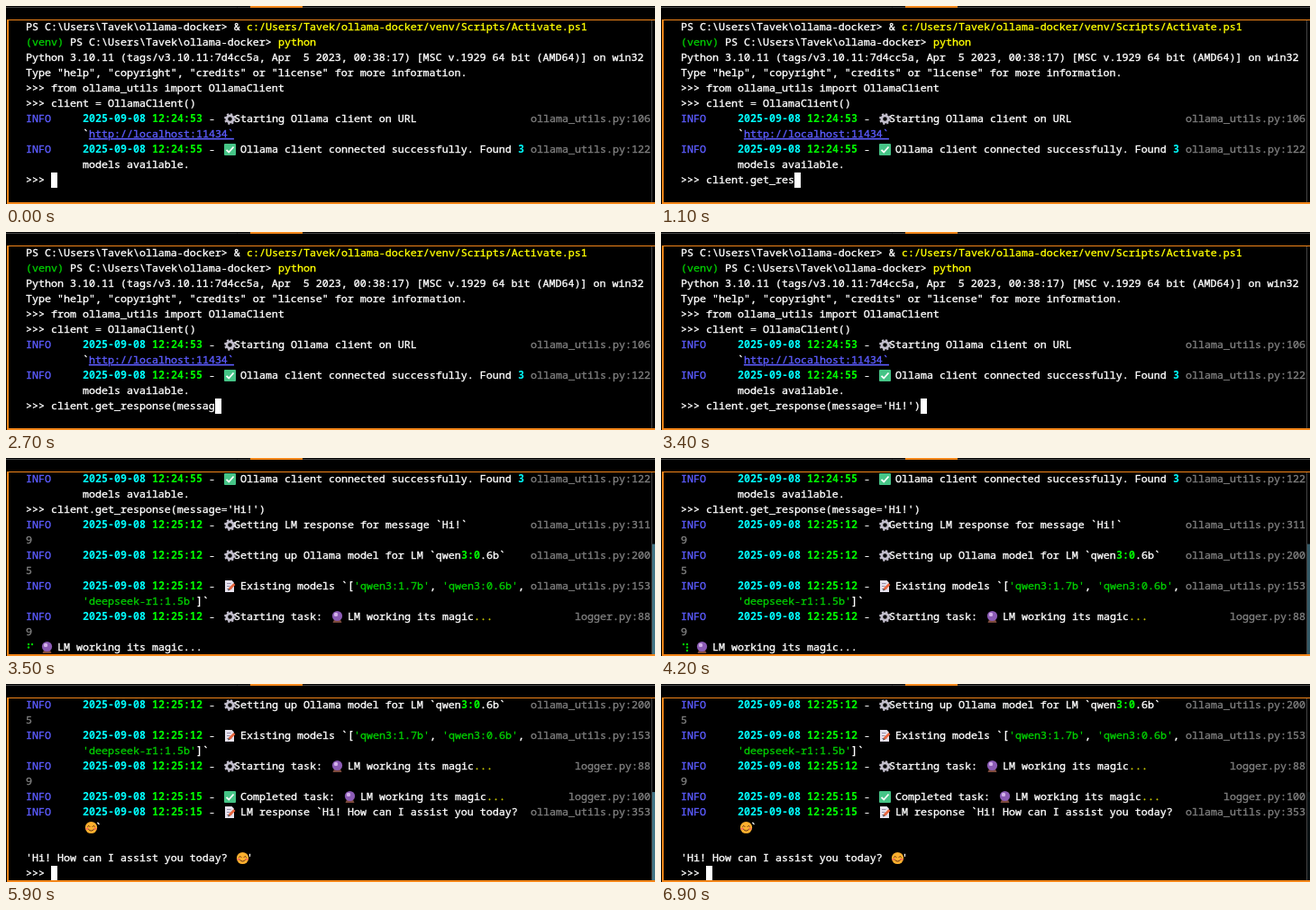
These frames come from a looping animation (720 by 220 pixels, 7000 ms). An HTML page:

```html
<!DOCTYPE html>
<html lang="en">
<head>
<meta charset="utf-8">
<title>Terminal session</title>
<style>
html, body { margin: 0; width: 100%; height: 100%; overflow: hidden; background: #000; }
svg { display: block; }
text { font: 11.667px "Noto Sans Mono", "DejaVu Sans Mono", monospace; white-space: pre; stroke-width: .35px; }
.bold { font-weight: 700; stroke-width: 0; }
.link { text-decoration: underline; }
</style>
</head>
<body>
<svg width="720" height="220" viewBox="0 0 720 220">
  <defs>
    <g id="gear" fill="none" stroke="#c3bfcd">
      <circle r="3.7" stroke-width="2.8"/>
      <circle r="5.4" stroke-width="2" stroke-dasharray="2.12"/>
    </g>
    <g id="check">
      <rect x="-6.5" y="-6.5" width="13" height="13" rx="1" fill="#45c486"/>
      <path d="M-4 .3L-1.3 3L4-3" fill="none" stroke="#fff" stroke-width="1.8"/>
    </g>
    <g id="memo">
      <path d="M-5.5-6.5H2L4.5-4V6.5H-5.5Z" fill="#e6e2ee"/>
      <path d="M-3.5-3H1M-3.5 0H0M-3.5 3H2" stroke="#998fa8"/>
      <path d="M-1 3.5L5-2.5" stroke="#e8643c" stroke-width="2.6"/>
      <path d="M-2.5 5L-1.7 2.6L0 4.3Z" fill="#444"/>
    </g>
    <g id="ball">
      <path d="M-5 6.5L-3 2H3L5 6.5Z" fill="#7d4a3c"/>
      <circle cy="-1" r="5.6" fill="#8b5bb5"/>
      <circle cx="-1.5" cy="-2.6" r="2.2" fill="#d3b2ea"/>
    </g>
    <g id="smile" fill="none" stroke="#5a2d16" stroke-linecap="round">
      <circle r="6.6" fill="#ffb02e" stroke="none"/>
      <path d="M-4-1Q-2.7-3.6-1.4-1M1.4-1Q2.7-3.6 4-1M-3 2Q0 5.4 3 2"/>
      <path d="M-5 1.3h1M4 1.3h1" stroke="#ff6b5a" stroke-width="2"/>
    </g>
  </defs>
  <path d="M0 1.5H720M716.5 16V218" stroke="#444"/>
  <g id="screen"></g>
  <g stroke="#f38518" stroke-width="2">
    <path d="M271 1H329M2 15V220M1 219H720"/>
    <path d="M1 15.5H720" stroke-width="1"/>
  </g>
</svg>
<script>
const LEFT = 22, TOP = 15, CELL = 7, ROW = 17, ROWS = 12, LAST_COL = 99;
const PRINT = 35, DONE = 56; // ticks of 100 ms

// Inline markup: "~x" switches style, "~>" aligns the rest to the right edge.
const styles = {
  w: ['#fff'], W: ['#fff', 'bold'], g: ['#00cd00'], G: ['#0f0', 'bold'], C: ['#0ff', 'bold'],
  y: ['#ff0'], Y: ['#cdcd00'], b: ['#5c5cff'], u: ['#5c5cff', 'link'], d: ['#7f7f7f'], '>': ['#7f7f7f']
};
const icons = { '⚙': 'gear', '✅': 'check', '📝': 'memo', '🔮': 'ball', '😊': 'smile' };

const info = (time, message, file) =>
  `~bINFO     ~C2025-09-08 ~G${time}~w - ${message}~>${file}`;
const indent = ' '.repeat(9);
const prompt = '>>> ';
const magic = '🔮 LM working its magic';
const command = "client.get_response(message='Hi!')";
const mistyped = 'client.get_resopns';
const typed = [0, 1, 3, 4, 5, 7, 8, 10, 11, 12, 13, 14, 15, 17, 18, 17, 15, 14,
  15, 16, 17, 18, 20, 21, 23, 24, 25, 26, 27, 28, 30, 31, 32, 33, 34];

const intro = [
  'PS C:\\Users\\Tavek\\ollama-docker> & ~yc:/Users/Tavek/ollama-docker/venv/Scripts/Activate.ps1',
  '~g(venv) ~wPS C:\\Users\\Tavek\\ollama-docker> ~ypython',
  'Python 3.10.11 (tags/v3.10.11:7d4cc5a, Apr  5 2023, 00:38:17) [MSC v.1929 64 bit (AMD64)] on win32',
  'Type "help", "copyright", "credits" or "license" for more information.',
  prompt + 'from ollama_utils import OllamaClient',
  prompt + 'client = OllamaClient()',
  info('12:24:53', '⚙Starting Ollama client on URL', 'ollama_utils.py:106'),
  indent + '`~uhttp://localhost:11434`',
  info('12:24:55', '✅ Ollama client connected successfully. Found ~C3', 'ollama_utils.py:122'),
  indent + 'models available.'
];
const task = [
  prompt + command,
  info('12:25:12', '⚙Getting LM response for message `Hi!`', 'ollama_utils.py:311'),
  '~d9',
  info('12:25:12', '⚙Setting up Ollama model for LM `qwen~G3:0~w.6b`', 'ollama_utils.py:200'),
  '~d5',
  info('12:25:12', "📝 Existing models `~W[~g'qwen3:1.7b'~w, ~g'qwen3:0.6b'~w,", 'ollama_utils.py:153'),
  indent + "~g'deepseek-r1:1.5b'~W]~w`",
  info('12:25:12', `⚙Starting task: ${magic}~Y...`, 'logger.py:88'),
  '~d9'
];
const answer = [
  info('12:25:15', `✅ Completed task: ${magic}~Y...`, 'logger.py:100'),
  info('12:25:15', '📝 LM response `Hi! How can I assist you today?', 'ollama_utils.py:353'),
  indent + '😊`',
  '',
  "'Hi! How can I assist you today? 😊'",
  prompt
];

const escapeText = s => s.replace(/&/g, '&amp;').replace(/</g, '&lt;');

function drawLine(line, row) {
  const y = TOP + row * ROW;
  let col = 0, style = 'w', out = '';
  for (const part of line.split(/(~.|⚙|✅|📝|🔮|😊)/u)) {
    const x = LEFT + col * CELL;
    if (part[0] === '~') {
      style = part[1];
    } else if (icons[part]) {
      out += `<use href="#${icons[part]}" x="${x + 9.5}" y="${y + 8.5}"/>`;
      col += 2;
    } else if (part) {
      const [color, cls = ''] = styles[style];
      const start = style === '>' ? LEFT + (LAST_COL - part.length) * CELL : x;
      out += `<text x="${start}" y="${y + 12}" fill="${color}" stroke="${color}" class="${cls}">${escapeText(part)}</text>`;
      col += part.length;
    }
  }
  return out;
}

const drawCursor = (col, row) =>
  `<rect x="${LEFT + col * CELL}" y="${TOP + row * ROW}" width="${CELL}" height="${ROW}" fill="#fff"/>`;

function drawSpinner(tick, row) {
  const step = Math.floor((tick - 42) * 100 / 63) + 22;
  const mask = '⠋⠙⠹⠸⠼⠴⠦⠧⠇⠏'.charCodeAt(step % 10) - 0x2800;
  let out = '';
  for (let dot = 0; dot < 6; dot++) {
    if (mask >> dot & 1) {
      const x = LEFT + 3 + 4 * Math.floor(dot / 3), y = TOP + row * ROW + 5 + 3.5 * (dot % 3);
      out += `<circle cx="${x}" cy="${y}" r="1.2" fill="#00cd00"/>`;
    }
  }
  return out;
}

// The thumb shows after each scroll, then fades over 800 ms.
function drawThumb(tick, total) {
  const fadeStart = tick < DONE ? 40 : 62;
  const opacity = 0.6 * Math.min(1, Math.max(0, 1 - (tick - fadeStart) / 8));
  const height = ROWS * ROW * ROWS / total;
  return `<rect x="717" y="${218 - height}" width="3" height="${height}" fill="#6fc3df" opacity="${opacity}"/>`;
}

function draw(tick) {
  const typing = tick < PRINT, done = tick >= DONE;
  const input = (tick > 11 && tick < 18 ? mistyped : command).slice(0, typed[tick]);
  const lines = typing ? [...intro, prompt + input]
    : [...intro, ...task, ...(done ? answer : ['  ' + magic + '...'])];
  const visible = lines.slice(-ROWS), last = visible.length - 1;
  let out = visible.map(drawLine).join('');
  if (typing) out += drawCursor(prompt.length + input.length, last);
  else out += drawThumb(tick, lines.length) +
    (done ? drawCursor(prompt.length, last) : drawSpinner(tick, last));
  document.getElementById('screen').innerHTML = out;
}

let shown = -1;
function loop() {
  const tick = Math.floor(performance.now() % 7000 / 100);
  if (tick !== shown) draw(shown = tick);
  requestAnimationFrame(loop);
}
loop();
</script>
</body>
</html>
```
